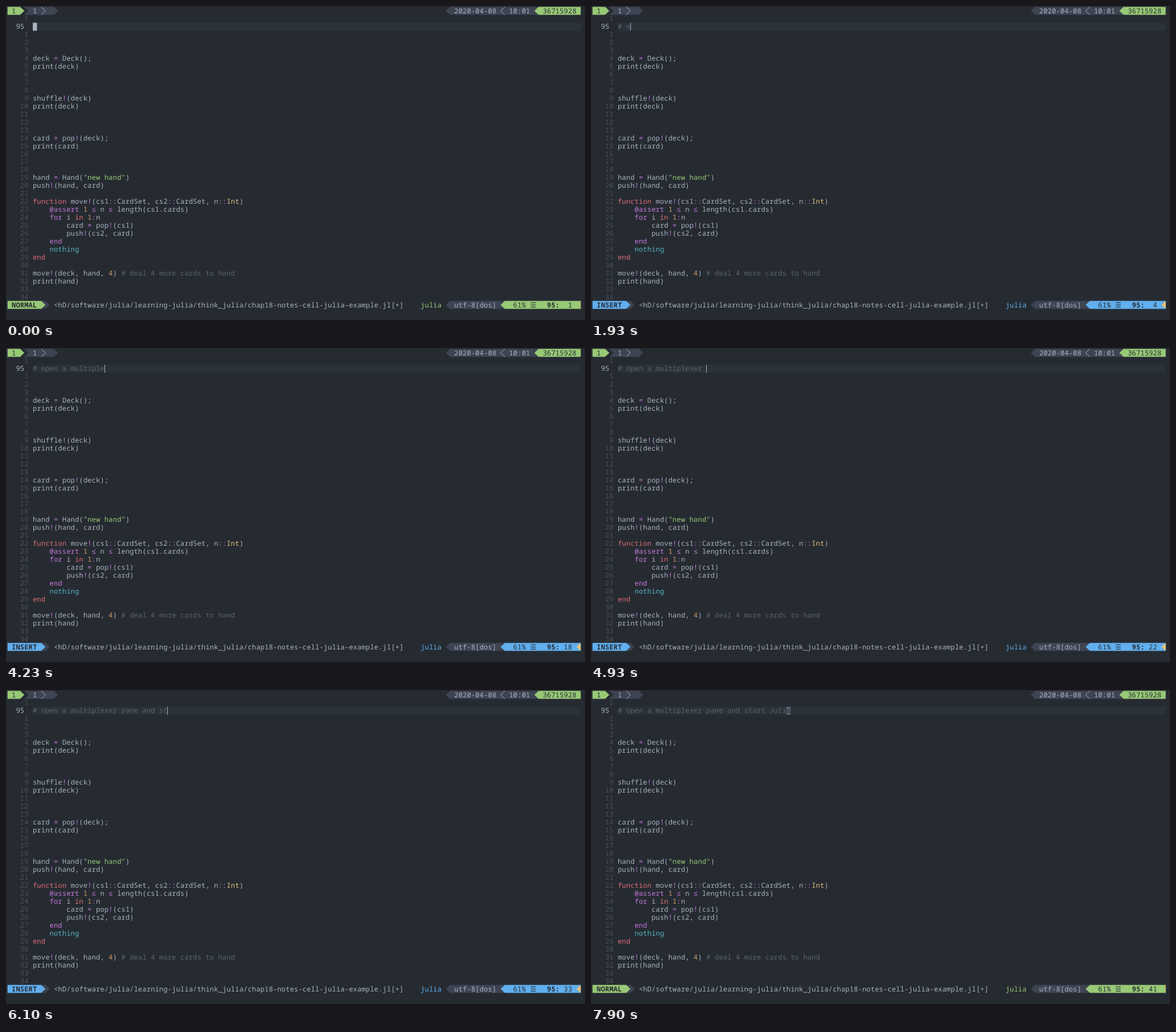
Animation of 1016 by 551 pixels, one loop 8000 ms. Source, as an HTML page:

```html
<!DOCTYPE html>
<html lang="en">
<head>
<meta charset="utf-8">
<title>Editor typing</title>
<style>
  html, body { margin: 0; width: 100%; height: 100%; overflow: hidden; background: #262b32; }
  svg {
    --bg: #262b32; --fg: #abb2bf; --bar: #3e4452;
    --green: #98c976; --blue: #61afef; --mode: var(--green);
    display: block; width: 1016px; height: 551px; background: var(--bg);
  }
  svg.insert { --mode: var(--blue); }
  text {
    font: 12.1px "Noto Sans Mono", "DejaVu Sans Mono", monospace;
    letter-spacing: calc(7.396px - 1ch);
    text-rendering: geometricPrecision;
    white-space: pre;
  }
  .fg { fill: var(--fg); }
  .bg { fill: var(--bg); }
  .bar { fill: var(--bar); }
  .green, .str { fill: var(--green); }
  .mode { fill: var(--mode); }
  .num { fill: #4b5159; }
  .note { fill: #5c6370; }
  .def { fill: #e06c75; }
  .key { fill: #c678dd; }
  .nil { fill: #56b6c2; }
  .type, .warn { fill: #e5c07b; }
  .lit { fill: #d19a66; }
  .line { fill: #2c323a; }
  .bold { font-weight: 700; }
  .thin { fill: none; stroke: var(--fg); stroke-width: 1; }
  .insert .normal-only, svg:not(.insert) .insert-only { display: none; }
</style>
</head>
<body>
<svg id="screen" viewBox="0 0 1016 551"></svg>
<script>
const CELL = 7.396, ROW = 13.946, LEFT = 2.6, TOP = 1.5, LOOP = 8000;
const CODE_COL = 6, STATUS = 37;
const COMMENT = "# open a multiplexer pane and start Julia";
const INSERT_AT = 630, NORMAL_AT = 7870, BLOCK_AT = 7900;

// Moment at which each character of the comment appears.
const KEYS = [
  1430, 1700, 1930, 2200, 2370, 2470, 2600, 2600, 2730, 2830,
  3070, 3200, 3370, 3500, 3670, 3800, 4230, 4530, 4730, 4830, 4930,
  5070, 5170, 5230, 5300, 5400, 5500, 5600, 5770, 5870, 5930,
  6100, 6200, 6300, 6500, 6600, 6800, 7030, 7130, 7230, 7370
];

// Code below the cursor line, keyed by relative line number.
const CODE = {
  4: "deck = Deck();",
  5: "print(deck)",
  9: "shuffle!(deck)",
  10: "print(deck)",
  14: "card = pop!(deck);",
  15: "print(card)",
  19: 'hand = Hand("new hand")',
  20: "push!(hand, card)",
  22: "function move!(cs1::CardSet, cs2::CardSet, n::Int)",
  23: "    @assert 1 ≤ n ≤ length(cs1.cards)",
  24: "    for i in 1:n",
  25: "        card = pop!(cs1)",
  26: "        push!(cs2, card)",
  27: "    end",
  28: "    nothing",
  29: "end",
  31: "move!(deck, hand, 4) # deal 4 more cards to hand",
  32: "print(hand)"
};

const TOKEN = /(?<note>#.*)|(?<str>".*?")|(?<def>\bfunction\b|\bin\b|^end)|(?<key>@assert|\bfor\b|\bend\b|[!≤=]|:+)|(?<nil>\bnothing\b)|(?<type>\bInt\b)|(?<lit>\b\d+\b)|(?<fg>[^\s#"@!≤=:()]+|[()])/g;

const x = col => LEFT + col * CELL;
const y = row => TOP + row * ROW;
const escape = s => s.replace(/&/g, "&amp;").replace(/</g, "&lt;");

const text = (col, row, str, cls, id = "") =>
  `<text x="${x(col)}" y="${y(row) + 11}" class="${cls}" id="${id}">${escape(str)}</text>`;

const box = (col, row, cols, cls, id = "") =>
  `<rect x="${x(col)}" y="${y(row)}" width="${cols * CELL}" height="${ROW}" class="${cls}" id="${id}"/>`;

// A bar from one column to another whose tip fills the cell next to "neck".
function arrow(base, neck, tip, row, cls) {
  const top = y(row), low = y(row + 1);
  return `<polygon class="${cls}" points="${x(base)},${top} ${x(neck)},${top} ` +
    `${x(tip)},${(top + low) / 2} ${x(neck)},${low} ${x(base)},${low}"/>`;
}
const right = (from, neck, row, cls) => arrow(from, neck, neck + 1, row, cls);
const left = (tip, end, row, cls) => arrow(end, tip + 1, tip, row, cls);

const chevron = (back, tip, row) =>
  `<polyline class="thin" points="${x(back)},${y(row)} ${x(tip)},${y(row + .5)} ${x(back)},${y(row + 1)}"/>`;

const highlight = (row, src) =>
  [...src.matchAll(TOKEN)].map(m => {
    const cls = Object.keys(m.groups).find(k => m.groups[k] !== undefined);
    return text(CODE_COL + m.index, row, m[0], cls);
  }).join("");

const topBar = () =>
  right(4, 11, 0, "bar") + right(4, 4, 0, "bg") + right(0, 3, 0, "green") +
  text(1, 0, "1", "bg") + text(6, 0, "1", "fg") + chevron(8, 9, 0) +
  left(104, 126, 0, "bar") + left(125, 136, 0, "green") +
  text(106, 0, "2020-04-08", "fg") + chevron(118, 117, 0) +
  text(119, 0, "10:01", "fg") + text(127, 0, "36715928", "bg");

const statusBar = () =>
  right(8, 9, STATUS, "bar") + right(0, 8, STATUS, "mode") +
  text(1, STATUS, "", "bg bold", "modeName") +
  text(11, STATUS, "<hD/software/julia/learning-julia/think_julia/chap18-notes-cell-julia-example.jl[+]", "fg") +
  text(98, STATUS, "julia", "mode") +
  left(104, 118, STATUS, "bar") + text(106, STATUS, "utf-8[dos]", "fg") +
  left(117, 136, STATUS, "mode") +
  text(120, STATUS, "61%", "bg") + text(124, STATUS, "☰", "bg") +
  text(128, STATUS, "95:", "bg bold") + text(132, STATUS, "", "bg", "column") +
  left(135, 136, STATUS, "warn insert-only") +
  `<rect x="1007.6" y="${y(STATUS)}" width="1" height="${ROW}" class="lit normal-only"/>`;

function editor() {
  let out = box(CODE_COL, 2, 130, "line") + text(4, 1, "1", "num") + text(2, 2, "95", "fg");
  for (let n = 1; n <= 34; n++) {
    out += text(3, n + 2, String(n).padStart(2), "num") + highlight(n + 2, CODE[n] || "");
  }
  return out + text(CODE_COL, 2, "", "note", "typed") +
    box(CODE_COL, 2, 1, "fg", "cursor") + text(CODE_COL + 40, 2, "a", "bg", "covered");
}

const screen = document.getElementById("screen");
screen.innerHTML = topBar() + editor() + statusBar();
const [modeName, column, typed, cursor, covered] =
  ["modeName", "column", "typed", "cursor", "covered"].map(id => document.getElementById(id));

function draw(t) {
  const count = KEYS.filter(k => k <= t).length;
  const insert = t >= INSERT_AT && t < NORMAL_AT;
  const beam = t >= INSERT_AT && t < BLOCK_AT;
  const done = t >= BLOCK_AT;
  const pos = t >= NORMAL_AT ? count - 1 : count;

  screen.classList.toggle("insert", insert);
  modeName.textContent = insert ? "INSERT" : "NORMAL";
  column.textContent = String(pos + 1).padStart(2);
  typed.textContent = COMMENT.slice(0, count);

  const cx = x(CODE_COL + pos);
  cursor.setAttribute("x", beam ? Math.round(cx - .2) : cx);
  cursor.setAttribute("width", beam ? 1 : CELL);
  cursor.setAttribute("class", done ? "note" : "fg");
  covered.style.display = done ? "" : "none";
}

const start = performance.now();
function tick() {
  draw((performance.now() - start) % LOOP);
  requestAnimationFrame(tick);
}
tick();
</script>
</body>
</html>
```
